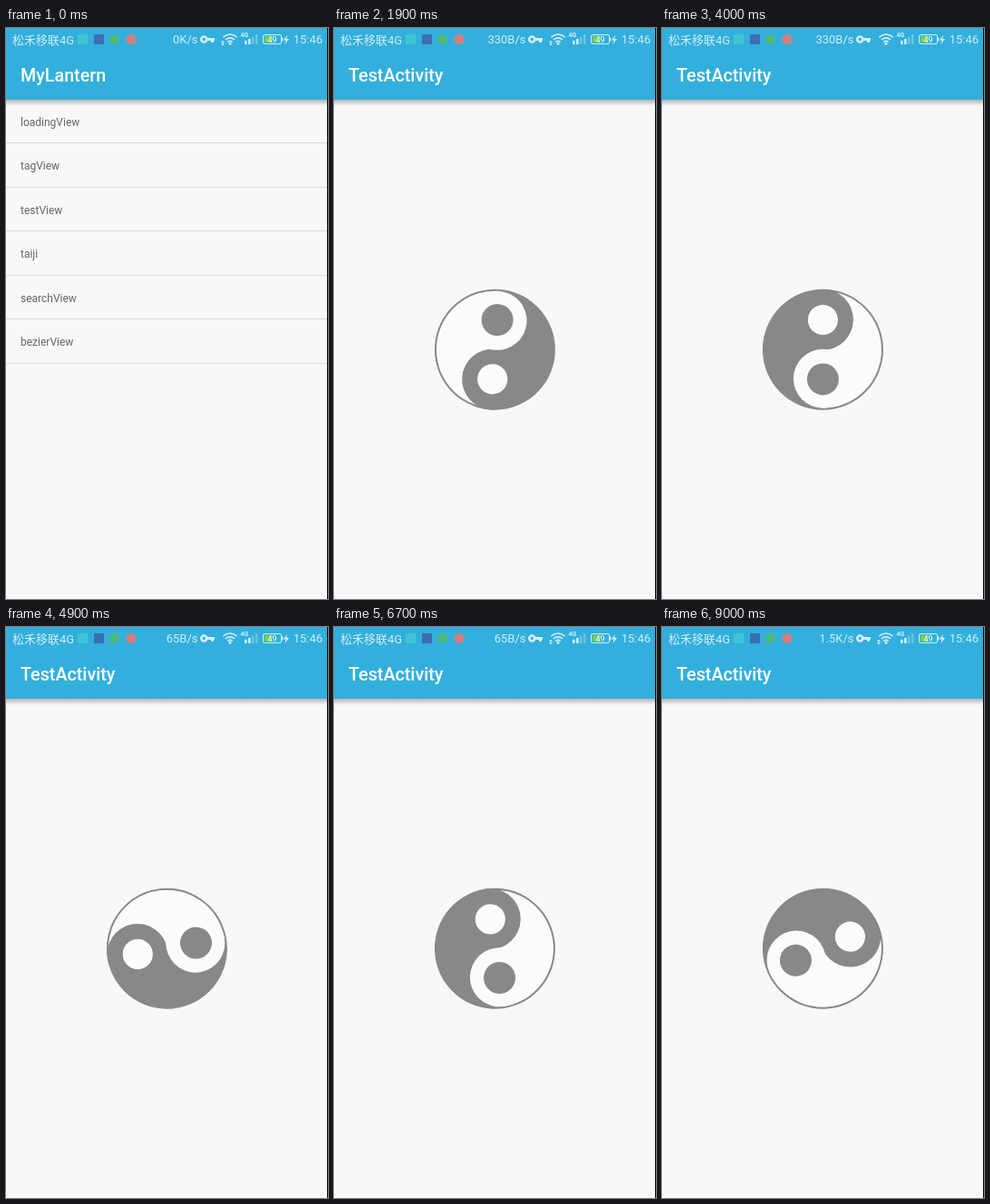
These frames come from a looping animation (355 px wide and 629 px high, 9.1 s). An HTML page:

```html
<!DOCTYPE html>
<html lang="en">
<head>
<meta charset="utf-8">
<style>
  html, body { margin: 0; width: 100%; height: 100%; overflow: hidden; background: #f8f9f9; }
  svg { display: block; width: 355px; height: 629px; font-family: Roboto, "Noto Sans CJK SC", "Noto Sans CJK", sans-serif; }
  .title { font-size: 19.7px; font-weight: 500; fill: #fff; }
  .row { font-size: 12px; fill: #666; }
  .status { font-size: 13px; fill: #d3edf8; }
</style>
</head>
<body>
<svg viewBox="0 0 355 629">
  <defs>
    <linearGradient id="shade" x2="0" y2="1">
      <stop stop-color="#000" stop-opacity=".27"/>
      <stop offset="1" stop-color="#000" stop-opacity="0"/>
    </linearGradient>
    <g id="page">
      <rect width="355" height="629" fill="#f8f8f8"/>
      <rect y="79" width="355" height="7" fill="url(#shade)"/>
      <rect width="355" height="79" fill="#32afdc"/>
    </g>
  </defs>

  <g id="menu">
    <use href="#page"/>
    <rect id="press" y="224" width="355" height="48" fill="#000" opacity="0"/>
    <text class="title" x="16" y="59">MyLantern</text>
    <g id="rows"></g>
  </g>
  <rect id="dim" width="355" height="629" opacity="0"/>

  <g id="detail">
    <use href="#page"/>
    <text class="title" x="16" y="59">TestActivity</text>
    <g id="taiji" fill="#888">
      <circle r="66.5"/>
      <path d="M0-64.5A64.5 64.5 0 0 1 0 64.5Z" fill="#fafbfb"/>
      <circle cy="-33" r="33.5"/>
      <circle cy="32" r="32.5" fill="#fafbfb"/>
      <circle cy="-32.7" r="16.6" fill="#fafbfb"/>
      <circle cy="32.7" r="17.5"/>
    </g>
  </g>

  <g class="status">
    <text x="7" y="17.5">松禾移联4G</text>
    <rect x="79" y="7" width="11" height="11" fill="#3fc4d4"/>
    <rect x="97" y="7" width="11" height="11" fill="#3b6fb0"/>
    <circle cx="119.5" cy="12.5" r="5.5" fill="#4fb878"/>
    <circle cx="138" cy="12.5" r="5.7" fill="#d27f80"/>
    <text id="speed" x="211.5" y="17.3" text-anchor="end"></text>
    <g fill="none" stroke="#d3edf8">
      <circle cx="218.3" cy="12.5" r="3" stroke-width="2.6"/>
      <path d="M222 12.5H230M227.5 12.5V16" stroke-width="2.8"/>
      <path d="M239.5 10.2Q247 3.8 254.5 10.2M242 13Q247 8.6 252 13M244.3 15.6Q247 13.2 249.7 15.6" stroke-width="1.6"/>
      <rect x="283.5" y="7.5" width="20" height="10" rx="1.5"/>
    </g>
    <circle cx="247" cy="17.2" r="1.5"/>
    <path id="arrows" d="M237 16.2l2-2.4 2 2.4zM237 17h4l-2 2.3z"/>
    <text x="258.5" y="9.5" font-size="7" font-weight="700">4G</text>
    <path d="M263 14h2.6v4H263zM267 12h2.6v6H267z"/>
    <path d="M271 9.5h2.6V18H271zM275 7h2.4v11H275z" opacity=".35"/>
    <rect x="285" y="9" width="8.5" height="7" fill="#75cf58"/>
    <rect x="304" y="10.5" width="1.4" height="4"/>
    <text x="293.5" y="16" font-size="9" text-anchor="middle" fill="#fff">49</text>
    <path d="M310 8l-4 5.4h2.5L307.5 18l4.5-6h-2.7z"/>
    <text x="349" y="17.3" text-anchor="end">15:46</text>
  </g>
  <rect x="354" width="1" height="629"/>
</svg>

<script>
const LOOP = 9100;
const $ = id => document.getElementById(id);
const clamp = v => Math.min(1, Math.max(0, v));

// [time in ms, clockwise degrees]
const turns = [[1000, 0], [2900, 390], [4000, 720], [5900, 1267], [7500, 1595], [9000, 1866.5]];

$('rows').innerHTML = ['loadingView', 'tagView', 'testView', 'taiji', 'searchView', 'bezierView']
  .map((name, i) => {
    const y = 107.7 + i * 48.55;
    return `<text class="row" x="16" y="${y}">${name}</text>
      <rect y="${Math.round(y + 18.5)}" width="355" height="1" fill="#d3dddd"/>`;
  }).join('');

function angleAt(t) {
  let angle = 0;
  for (let i = 1; i < turns.length; i++) {
    const [t0, a0] = turns[i - 1], [t1, a1] = turns[i];
    angle += (a1 - a0) * clamp((t - t0) / (t1 - t0));
  }
  return angle;
}

function draw(t) {
  const slide = 1 - (1 - clamp((t - 600) / 508)) ** 3;
  $('menu').setAttribute('transform', `translate(${-118 * slide} 0)`);
  $('detail').setAttribute('transform', `translate(${355 * (1 - slide)} 0)`);
  $('dim').setAttribute('opacity', 0.37 * slide);
  $('press').setAttribute('opacity', t < 300 ? 0 : 0.06);
  $('taiji').setAttribute('transform', `translate(177.4 354.2) rotate(${angleAt(t)})`);
  $('speed').textContent = t < 1600 ? '0K/s' : t < 4500 ? '330B/s' : t < 7400 ? '65B/s' : '1.5K/s';
  const idle = (t >= 3600 && t < 5300) || (t >= 5800 && t < 6600);
  $('arrows').setAttribute('opacity', idle ? 0 : 1);
}

// The picture advances ten times a second.
function tick() {
  draw(Math.floor(performance.now() % LOOP / 100) * 100);
  requestAnimationFrame(tick);
}
tick();
</script>
</body>
</html>
```
